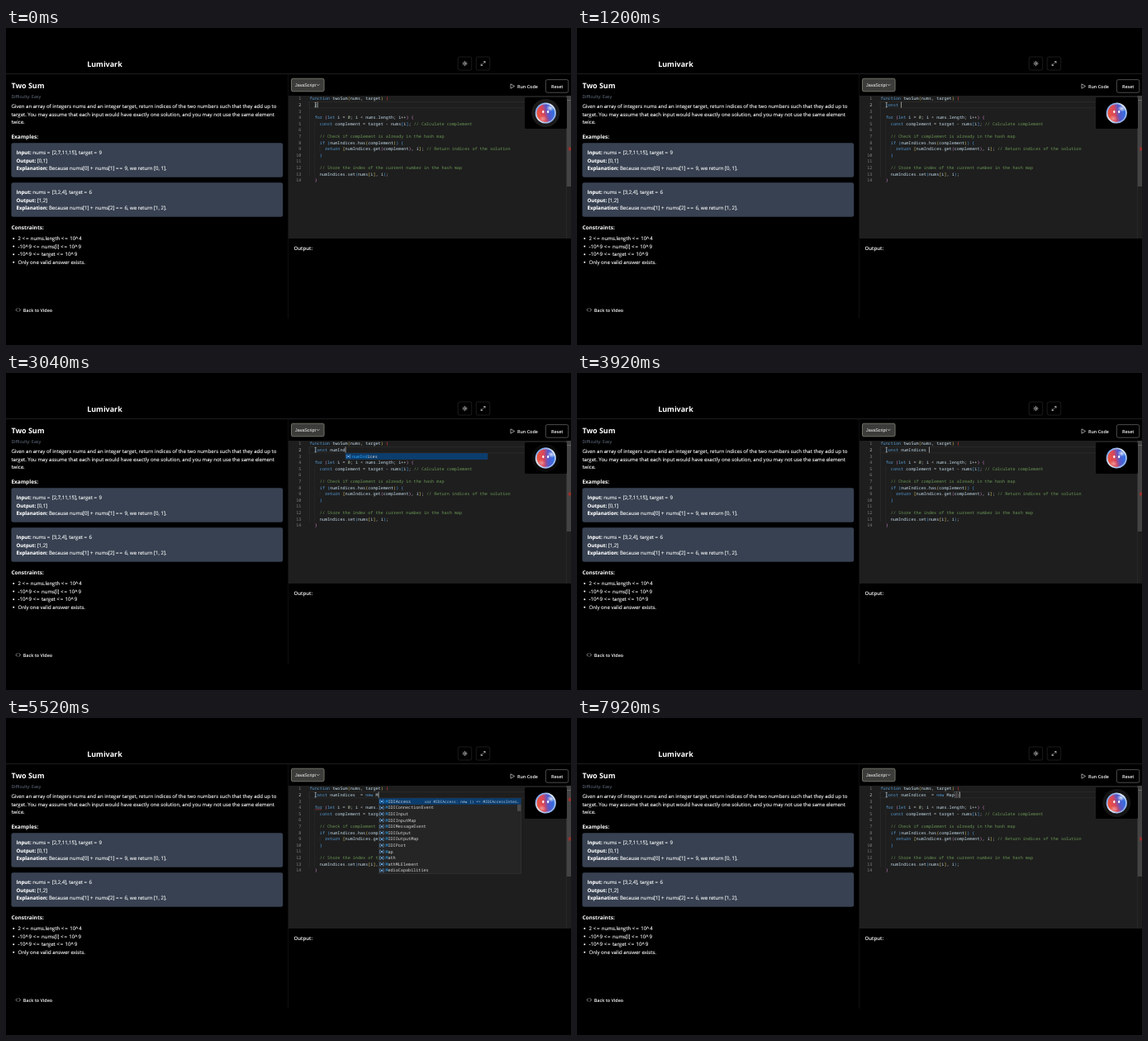
Write an HTML page that moves like this. It is 684 px wide and 384 px high and loops after 8000 ms.

```html
<!DOCTYPE html>
<html lang="en">
<head>
<meta charset="utf-8">
<title>Two Sum</title>
<style>
html, body { margin: 0; width: 100%; height: 100%; overflow: hidden; background: #000; }
svg { display: block; width: 684px; height: 384px; }
text { font: 6.07px "Open Sans", "Noto Sans", sans-serif; fill: #fff; white-space: pre; text-rendering: geometricPrecision; }
.prose { stroke: #fff; stroke-width: .1px; }
.h1 { font-size: 8.95px; font-weight: 700; }
.h2 { font-size: 6.5px; font-weight: 700; }
.btn { font-size: 5.4px; font-weight: 600; }
.out { font-weight: 600; }
.dim { font-size: 5.3px; fill: #6f7c90; }
.pick { font: 5.33px "Liberation Sans", sans-serif; }
.b { font-weight: 700; }
.op { letter-spacing: .9px; }
.code { font: 5.133px "Noto Sans Mono", "DejaVu Sans Mono", monospace; fill: #d4d4d4; }
.small { font-size: 4.55px; fill: #b9c9d8; }
.num { fill: #858585; text-anchor: end; }
.line { fill: none; stroke: #e4e4e4; stroke-width: .65; stroke-linecap: round; stroke-linejoin: round; }
</style>
</head>
<body>
<svg viewBox="0 0 684 384">
  <defs>
    <linearGradient id="orb" x1="0" y1=".65" x2="1" y2=".35">
      <stop offset="0" stop-color="#f0583c"/>
      <stop offset=".4" stop-color="#d8465a"/>
      <stop offset=".62" stop-color="#5a58c8"/>
      <stop offset="1" stop-color="#2a74e8"/>
    </linearGradient>
    <linearGradient id="rim" x1="0" y1="0" x2="1" y2=".8">
      <stop offset="0" stop-color="#3f86ee"/>
      <stop offset=".5" stop-color="#e3e8f4"/>
      <stop offset="1" stop-color="#7fa6ec"/>
    </linearGradient>
    <radialGradient id="gloss">
      <stop offset="0" stop-color="#fff" stop-opacity=".8"/>
      <stop offset="1" stop-color="#fff" stop-opacity="0"/>
    </radialGradient>
  </defs>
  <g id="page"></g>
  <g id="typed"></g>
  <g id="error">
    <path d="M373.7 111.4l1.2 -1 1.2 1 1.2 -1 1.2 1 1.2 -1 1.2 1 1.2 -1" fill="none" stroke="#d04545" stroke-width=".5"/>
    <rect x="681" y="96.8" width="3" height="4" fill="#9a302b"/>
  </g>
  <g id="menu"></g>
  <g id="face">
    <rect x="628" y="84" width="51" height="38" rx="1.6"/>
    <circle id="halo" cx="653.3" cy="103" r="17" fill="#222"/>
    <g id="ball">
      <circle cx="653.3" cy="103" r="12.6" fill="url(#rim)"/>
      <circle cx="653.3" cy="103" r="10.8" fill="url(#orb)"/>
      <ellipse cx="659" cy="97" rx="5" ry="4" fill="url(#gloss)"/>
      <ellipse cx="650" cy="110" rx="5" ry="4" fill="url(#gloss)" opacity=".5"/>
    </g>
    <g fill="#fff">
      <ellipse cx="650.3" cy="101.5" rx="1.1" ry="1.7"/>
      <ellipse cx="656.2" cy="101.5" rx="1.1" ry="1.7"/>
    </g>
  </g>
</svg>
<script>
const $ = id => document.getElementById(id);
const LOOP = 8000, CH = 3.08, ROW = 7.6, LEFT = 367.5, BASE = 87.4;
const colX = c => LEFT + c * CH;
const rowY = n => BASE + (n - 1) * ROW;
const esc = s => s.replace(/&/g, '&amp;').replace(/</g, '&lt;').replace(/>/g, '&gt;');
const text = (x, y, body, cls = 'prose') => `<text x="${x}" y="${y}" class="${cls}">${body}</text>`;
const rect = (x, y, w, h, fill, more = '') =>
  `<rect x="${x}" y="${y}" width="${w}" height="${h}" fill="${fill}" ${more}/>`;
const span = (s, color) => `<tspan fill="${color}">${esc(s)}</tspan>`;
const path = (d, more = '') => `<path class="line" d="${d}" ${more}/>`;
const prose = s => s.replace(/[<=+^]+/g, m => `<tspan class="op">${esc(m)}</tspan>`);

// Syntax colouring
const BRACKETS = ['#e0c860', '#d58ad0', '#4da3f0'];
const TOKEN = /\/\/.*|[A-Za-z]\w*|\d+|[()[\]{}]|\s+|./g;
const KEYWORD = /^(function|const|for|let|if|return|new)$/;
function paint(src, depth) {
  return src.match(TOKEN).map(t => {
    if (t.startsWith('//')) return span(t, '#6a9955');
    if (KEYWORD.test(t)) return span(t, '#569cd6');
    if (/^[A-Za-z]/.test(t)) return span(t, '#c4dcea');
    if (/^\d/.test(t)) return span(t, '#b5cea8');
    if ('([{'.includes(t)) return span(t, BRACKETS[depth++ % 3]);
    if (')]}'.includes(t)) return span(t, BRACKETS[--depth % 3]);
    return esc(t);
  }).join('');
}

const CODE = [
  'function twoSum(nums, target) ', '', '',
  '  for (let i = 0; i < nums.length; i++) {',
  '    const complement = target - nums[i]; // Calculate complement', '',
  '    // Check if complement is already in the hash map',
  '    if (numIndices.has(complement)) {',
  '      return [numIndices.get(complement), i]; // Return indices of the solution',
  '    }', '',
  '    // Store the index of the current number in the hash map',
  '    numIndices.set(nums[i], i);',
  '  }'
];

function header() {
  const button = x => rect(x, 35, 16.5, 16, '#000', 'rx="2" stroke="#2e2e32" stroke-width=".6"');
  let rays = '';
  for (let i = 0; i < 8; i++) {
    const c = Math.cos(i * Math.PI / 4), s = Math.sin(i * Math.PI / 4);
    rays += `M${555.5 + 2 * c} ${43 + 2 * s}L${555.5 + 2.7 * c} ${43 + 2.7 * s}`;
  }
  return text(98.2, 46.6, 'Lumivark', 'h1') + button(547.2) + button(569.2) +
    '<circle class="line" cx="555.5" cy="43" r="1.1"/>' + path(rays) +
    path('M578.4 40.6H580V42.2M580 40.6L578.2 42.4M576.8 45.4H575.2V43.8M575.2 45.4L577 43.6') +
    rect(0, 55, 684, .8, '#252529') + rect(341.4, 55, .6, 297, '#1a1a1d');
}

function card(y, lines) {
  return rect(6.4, y, 328.8, 41.6, '#374151', 'rx="2.4"') +
    lines.map(([name, body], i) =>
      text(12.5, y + 13.8 + i * 9.6, `<tspan class="b">${name}:</tspan> ${prose(body)}`)).join('');
}

function problem() {
  const story = [
    'Given an array of integers nums and an integer target, return indices of the two numbers such that they add up to',
    'target. You may assume that each input would have exactly one solution, and you may not use the same element',
    'twice.'
  ];
  const limits = ['2 <= nums.length <= 10^4', '-10^9 <= nums[i] <= 10^9',
    '-10^9 <= target <= 10^9', 'Only one valid answer exists.'];
  return text(6.4, 72.6, 'Two Sum', 'h1') + text(6.4, 84.7, 'Difficulty: Easy', 'dim') +
    story.map((s, i) => text(6.4, 97.1 + i * 9.6, s)).join('') +
    text(6.4, 133.5, 'Examples:', 'h2') +
    card(139.2, [['Input', 'nums = [2,7,11,15], target = 9'], ['Output', '[0,1]'],
      ['Explanation', 'Because nums[0] + nums[1] == 9, we return [0, 1].']]) +
    card(187.2, [['Input', 'nums = [3,2,4], target = 6'], ['Output', '[1,2]'],
      ['Explanation', 'Because nums[1] + nums[2] == 6, we return [1, 2].']]) +
    text(6.4, 243.9, 'Constraints:', 'h2') +
    limits.map((s, i) => `<circle cx="9.2" cy="${255 + i * 9.6}" r="1" fill="#fff"/>` +
      text(14.5, 257.2 + i * 9.6, prose(s))).join('') +
    path('M13.6 339.8L12 341.5L13.6 343.2M15.9 339.8L17.5 341.5L15.9 343.2') +
    text(20.8, 343.5, 'Back to Video', 'btn');
}

function toolbar() {
  return rect(345.5, 61.2, 39.6, 15.6, '#3c3c3a', 'rx="1.8" stroke="#929289" stroke-width=".7"') +
    text(350, 71, 'JavaScript', 'pick') + path('M376.2 68.3L377.7 69.8L379.2 68.3') +
    path('M611.3 68L615.6 70.5L611.3 73Z') + text(619, 72.5, 'Run Code', 'btn') +
    rect(653.4, 62.6, 27.4, 15.6, '#000', 'rx="2" stroke="#808080" stroke-width=".6"') +
    text(660, 72.5, 'Reset', 'btn') + text(348.4, 268.7, 'Output:', 'out');
}

function editor() {
  const guide = (col, from, to) => rect(colX(col), rowY(from) - 5.7, .4, (to - from + 1) * ROW, '#343434');
  let out = rect(342, 82, 342, 173, '#1e1e1e') +
    rect(367, 89.4, 311, 7.4, 'none', 'stroke="#2c2c2c" stroke-width=".7"') +
    guide(0, 2, 13) + guide(2, 5, 13) + guide(4, 9, 9);
  let depth = 0;
  CODE.forEach((src, i) => {
    const n = i + 1, color = n === 2 ? ' style="fill:#c6c6c6"' : '';
    out += `<text x="357.3" y="${rowY(n)}" class="code num"${color}>${n}</text>`;
    const body = src.trimStart();
    if (body) out += text(colX(src.length - body.length), rowY(n), paint(body, depth), 'code');
    if (n === 1 || body.endsWith('{')) depth++;
    if (body === '}') depth--;
  });
  return out + text(colX(30), rowY(1), span('{', '#e8453c'), 'code') +
    rect(678.2, 82, .5, 173, '#333') + rect(678.7, 82, 5.3, 110, '#434343') +
    rect(678.7, 87, 5.3, .8, '#707070') + rect(681, 144.5, 3, 4, '#9a302b') +
    path('M374 90.4H375.4M374.7 90.4V95.8M374 95.8H375.4', 'style="stroke-width:.5"');
}

// Typing: [time, characters before the caret]
const LINE = 'const numIndices  = new Map()';
const KEYS = [[0, 1], [160, 2], [320, 3], [480, 4], [640, 5], [880, 6],
  [1760, 7], [2000, 8], [2240, 9], [2480, 10], [2720, 11], [2880, 12], [3440, 16],
  [3920, 17], [4240, 18], [4400, 19], [4640, 20], [4960, 21], [5120, 22], [5280, 23],
  [5360, 24], [5440, 25], [5760, 26], [6000, 27], [7200, 28], [7600, 29]];
const TYPES = ['MIDIAccess', 'MIDIConnectionEvent', 'MIDIInput', 'MIDIInputMap', 'MIDIMessageEvent',
  'MIDIOutput', 'MIDIOutputMap', 'MIDIPort', 'Map', 'Math', 'MathMLElement', 'MediaCapabilities'];

function drawLine(n, caret) {
  const shown = n >= 28 ? LINE : LINE.slice(0, n);
  let out = '';
  if (n >= 28) {
    for (const c of [27, 28])
      out += rect(colX(2 + c), rowY(2) - 5.3, CH, 7, '#1d261d', 'stroke="#777" stroke-width=".4"');
  }
  out += text(colX(2), rowY(2), paint(shown, 1), 'code');
  if (caret) out += rect(colX(2 + n), rowY(2) - 5.6, .8, 7.2, '#aeafad');
  return out;
}

function drawMenu(n, t) {
  let items = [], prefix = '';
  if (n >= 10 && n <= 12) {
    items = ['numIndices'];
    prefix = LINE.slice(6, n);
  } else if (n >= 25 && n <= 27 && t < 6320) {
    prefix = LINE.slice(24, n);
    items = TYPES.filter(s => s.startsWith(prefix));
  }
  if (!items.length) return '';
  const x = prefix[0] === 'n' ? 411 : 451.4, top = 97.2;
  let out = rect(x, top, 172, items.length * ROW, '#252526', 'stroke="#454545" stroke-width=".4"') +
    rect(x, top, 172, ROW, '#0b3d6e');
  items.forEach((s, i) => {
    const y = top + i * ROW;
    out += path(`M${x + 2.2} ${y + 2}h-1v3.8h1M${x + 4.8} ${y + 2}h1v3.8h-1`, 'style="stroke:#75beff;stroke-width:.5"') +
      rect(x + 2.5, y + 3, 2, 1.8, '#75beff') +
      text(x + 8, y + 5.6, span(prefix, '#2aaaff') + esc(s.slice(prefix.length)), 'code');
  });
  if (items.length > 9) {
    out += text(506.5, top + 5.3, esc('var MIDIAccess: new () => MIDIAccessInter…'), 'code small') +
      rect(619, top + ROW, 4.4, 8, '#4a4a4c');
  }
  return out;
}

$('page').innerHTML = header() + problem() + editor() + toolbar();

let last = '';
function frame() {
  const t = performance.now() % LOOP;
  const [at, n] = KEYS.filter(k => k[0] <= t).pop();
  const caret = (t - at) % 1000 < 500;
  const key = `${n}/${caret}/${t < 6320}`;
  if (key !== last) {
    $('typed').innerHTML = drawLine(n, caret);
    $('menu').innerHTML = drawMenu(n, t);
    last = key;
  }
  $('error').setAttribute('visibility', t > 5200 && t < 7300 ? 'visible' : 'hidden');
  const turn = 20 * Math.sin(t / LOOP * 6 * Math.PI);
  const pulse = Math.max(0, Math.cos((t - 6560) / 1600 * 2 * Math.PI));
  $('ball').setAttribute('transform', `rotate(${turn.toFixed(2)} 653.3 103)`);
  $('halo').setAttribute('opacity', pulse.toFixed(3));
  requestAnimationFrame(frame);
}
frame();
</script>
</body>
</html>
```
